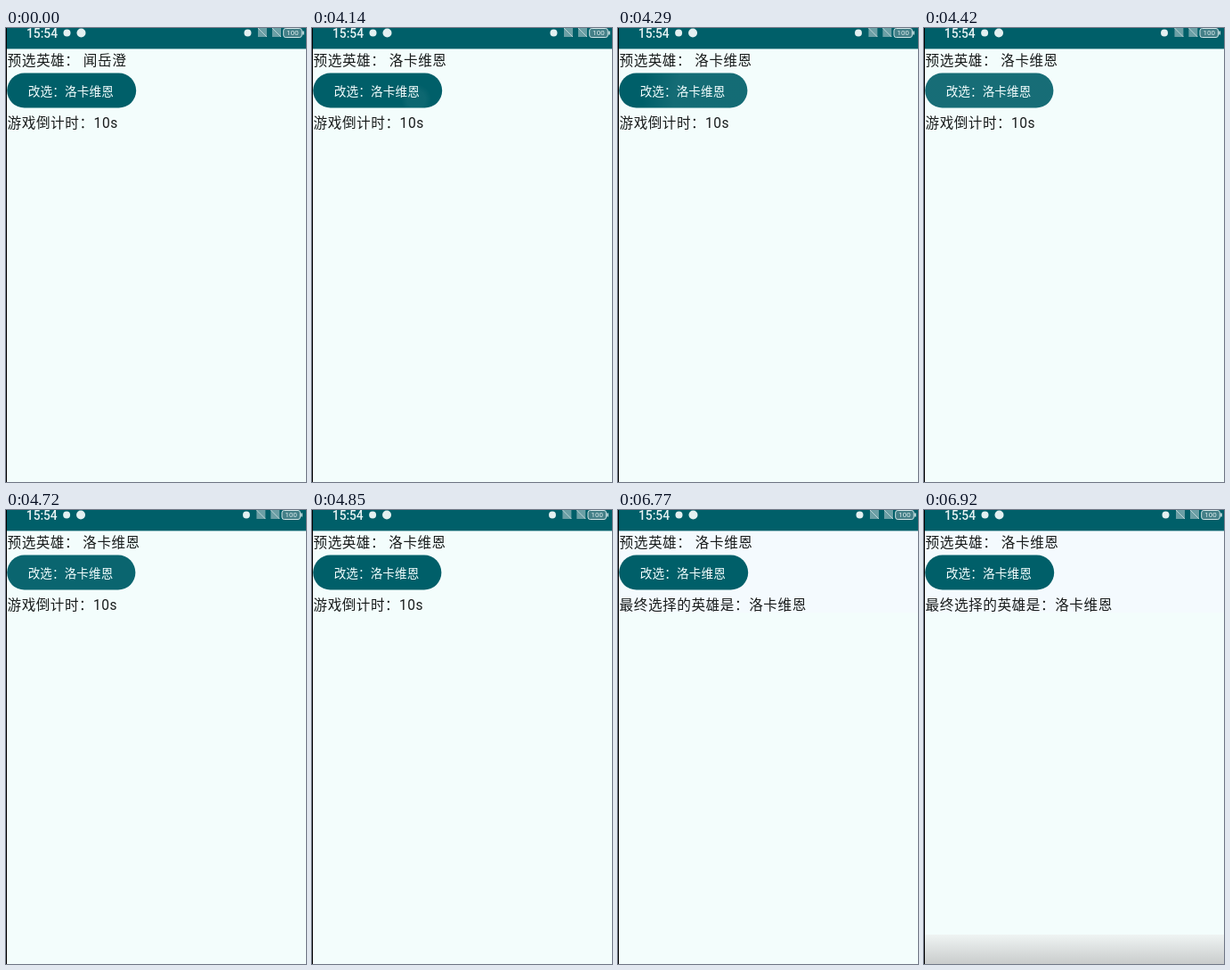
These frames come from a looping animation (337 px wide and 509 px high, 9.69 s). An HTML page:

```html
<!DOCTYPE html>
<html lang="zh-CN">
<head>
<meta charset="utf-8">
<style>
  html, body { margin: 0; width: 100%; height: 100%; overflow: hidden; background: #f3fdfc; }
  svg { display: block; width: 100vw; height: 100vh; }
  text { font: 15.65px Roboto, "Noto Sans CJK SC", "Noto Sans CJK", sans-serif; letter-spacing: .53px; fill: #191c1c; }
  .clock { font-size: 13.8px; font-weight: 500; letter-spacing: 0; fill: #e8f3f4; }
  .label { font-size: 13.65px; letter-spacing: .1px; fill: #f5ffff; }
  .charge { font-size: 8px; letter-spacing: 0; fill: #e4f0f1; }
</style>
</head>
<body>
<svg viewBox="0 0 337 509" preserveAspectRatio="none">
  <defs>
    <linearGradient id="shade" x2="0" y2="1">
      <stop stop-color="#eff4f3"/><stop offset="1" stop-color="#c9cccc"/>
    </linearGradient>
    <radialGradient id="glow">
      <stop stop-color="#fff"/><stop offset=".6" stop-color="#fff"/><stop offset="1" stop-color="#fff" stop-opacity="0"/>
    </radialGradient>
    <clipPath id="pill"><rect x="1.2" y="50.6" width="145" height="39" rx="19.5"/></clipPath>
    <g id="signal">
      <path d="M0 0H10V10H0Z" fill="#6b9fa5"/>
      <path d="M0 0L10 10" stroke="#b9d2d5"/>
    </g>
  </defs>
  <rect width="337" height="509" fill="#f3fdfc"/>
  <rect id="tint" y="23" width="337" height="92" fill="#f4fafe"/>
  <rect id="footer" y="476" width="337" height="33" fill="url(#shade)"/>
  <rect width="337" height="23.4" fill="#005f69"/>
  <g id="content">
    <text class="clock" x="23" y="11">15:54</text>
    <g fill="#e4f0f1">
      <circle cx="68.5" cy="5.5" r="4"/>
      <circle cx="84.5" cy="5.5" r="5"/>
      <circle cx="271.5" cy="5.5" r="4"/>
    </g>
    <use href="#signal" x="283"/>
    <use href="#signal" x="299"/>
    <rect x="311.7" y=".5" width="20.6" height="10" rx="2.5" fill="#437f87" stroke="#d3e5e7"/>
    <path d="M334 3.5V7.5" stroke="#d3e5e7" stroke-width="1.6"/>
    <text class="charge" x="322" y="8.3" text-anchor="middle">100</text>
    <text id="choice" x="1.6" y="41.8"></text>
    <g clip-path="url(#pill)">
      <rect y="50" width="147" height="40" fill="#005f69"/>
      <circle id="ripple" cx="117" cy="80" fill="url(#glow)"/>
    </g>
    <text class="label" x="24.8" y="76">改选：洛卡维恩</text>
    <text id="status" x="1.6" y="111.8"></text>
  </g>
  <rect width="1" height="509" fill="#000"/>
</svg>
<script>
  const LOOP = 9690, FIRST = '闻岳澄', SECOND = '洛卡维恩';
  const el = id => document.getElementById(id);
  const show = (id, on) => el(id).setAttribute('visibility', on ? 'visible' : 'hidden');

  // start time, radius, opacity of the touch ripple
  const ripples = [[0, 0, 0], [4140, 17, .05], [4290, 90, .08], [4420, 220, .09], [4720, 220, .04], [4850, 0, 0]];

  function draw(now) {
    const t = now % LOOP;
    const chosen = t >= 4140, done = t >= 6770;
    const narrow = t >= 4290 && !done;

    el('choice').textContent = '预选英雄： ' + (chosen ? SECOND : FIRST);
    el('status').textContent = done ? '最终选择的英雄是：' + SECOND : '游戏倒计时：10s';
    el('content').setAttribute('transform', `scale(${narrow ? .9945 : 1} 1)`);
    show('tint', done);
    show('footer', t >= 6920);

    const [, radius, opacity] = ripples.findLast(r => t >= r[0]);
    el('ripple').setAttribute('r', radius);
    el('ripple').setAttribute('opacity', opacity);
    requestAnimationFrame(draw);
  }
  draw(performance.now());
</script>
</body>
</html>
```
